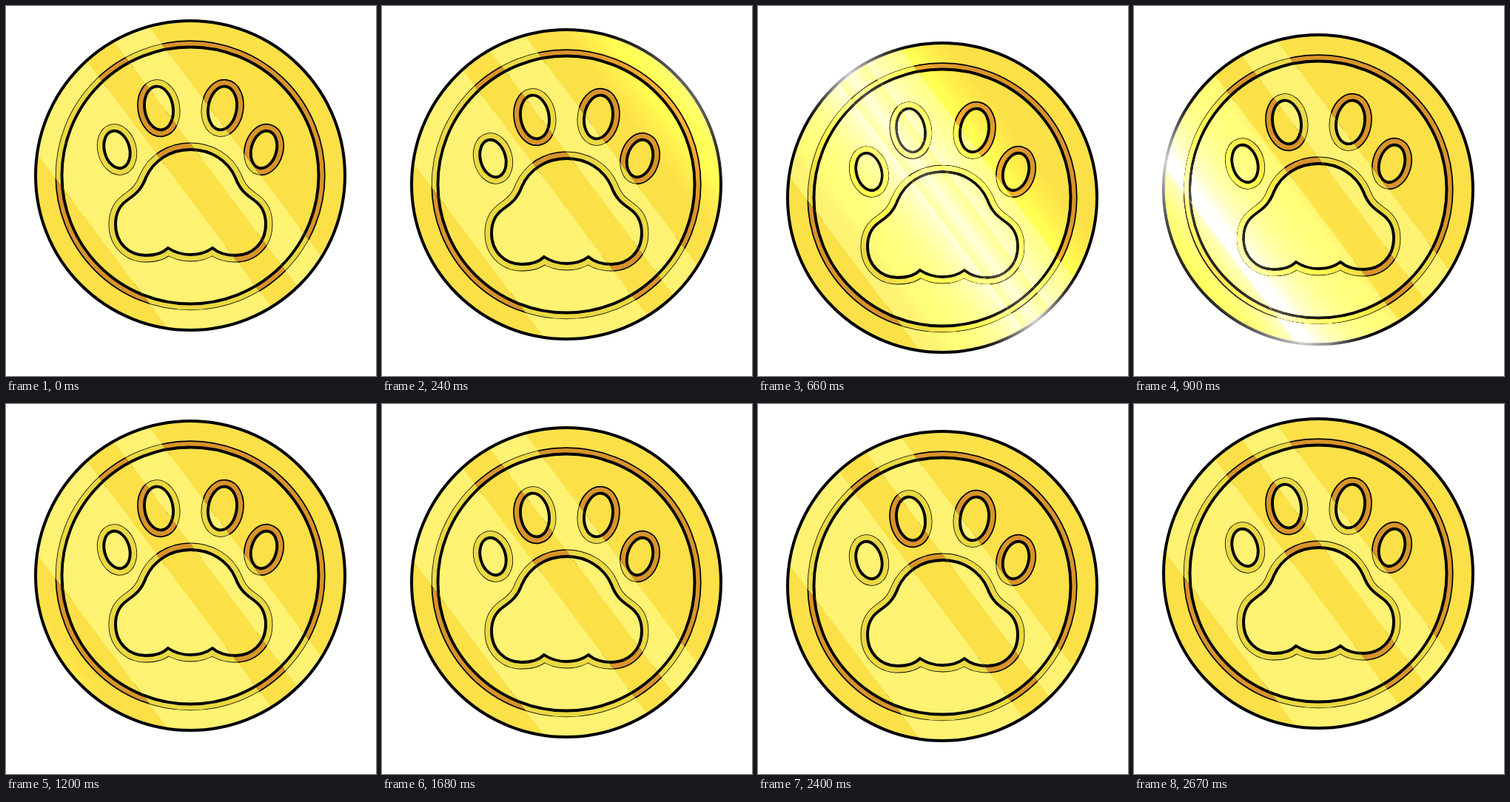
Animation of 500 by 500 pixels, one loop 2.7 s. Source, as an HTML page with a canvas:

```html
<!DOCTYPE html>
<html lang="en">
<head>
<meta charset="utf-8">
<title>Paw coin</title>
<style>
  html, body { margin: 0; width: 100%; height: 100%; overflow: hidden; background: #fff; }
  canvas { display: block; }
</style>
</head>
<body>
<canvas id="stage" width="500" height="500"></canvas>
<script>
const ctx = document.getElementById('stage').getContext('2d');
const LOOP = 2700, STEP = 30;
const CX = 249, CY = 229, RADIUS = 209;

// Unit normal of the diagonal stripes, pointing to the upper right
const NX = 0.8, NY = -0.6;

const LIGHT = { fill: '#fdf272', groove: '#ebd942', line: 0.8 };
const DARK = { fill: '#fbe048', groove: '#d9942a', line: 1.7 };
const DARK_STRIPES = [[-300, -148], [-19, 26], [76, 300]];

function circle(r) {
  const path = new Path2D();
  path.arc(0, 0, r, 0, Math.PI * 2);
  return path;
}

function toe(x, y, rx, ry, degrees) {
  const path = new Path2D();
  path.ellipse(x, y, rx, ry, degrees * Math.PI / 180, 0, Math.PI * 2);
  return path;
}

const coin = circle(RADIUS);
const face = circle(173.5);
const pads = [
  toe(-99, -35, 17, 25.7, -15),
  toe(-42.5, -91, 19.2, 29.6, -9),
  toe(43.5, -91, 19.2, 29.6, 9),
  toe(99.5, -35, 17, 25.7, 15),
  new Path2D(`M0.5-35C-27-35-50-20-60 3C-67 22-77 27-86 34
    C-97 42-101 52-101 66C-101 91-83 108-60 108
    C-48 108-37 105-30 98C-21 104-11 107 0.5 107
    C12 107 22 104 30 98C38 105 49 108 61 108
    C84 108 102 91 102 66C102 52 98 42 87 34
    C78 27 68 22 61 3C51-20 28-35 0.5-35Z`)
];

function stroke(path, width, color) {
  ctx.lineWidth = width;
  ctx.strokeStyle = color;
  ctx.stroke(path);
}

// A shape with a coloured groove around it
function emboss(path, gap, theme) {
  stroke(path, 2 * gap + theme.line, '#000');
  stroke(path, 2 * gap - theme.line, theme.groove);
  ctx.fillStyle = theme.fill;
  ctx.fill(path);
  stroke(path, 3.9, '#000');
}

function drawFaceplate(theme) {
  ctx.fillStyle = theme.fill;
  ctx.fill(coin);
  emboss(face, 8.3, theme);
  for (const pad of pads) emboss(pad, 9, theme);
}

function clipToStripes() {
  const point = (across, along) => [NX * across - NY * along, NY * across + NX * along];
  const area = new Path2D();
  for (const [from, to] of DARK_STRIPES) {
    area.moveTo(...point(from, -300));
    area.lineTo(...point(to, -300));
    area.lineTo(...point(to, 300));
    area.lineTo(...point(from, 300));
    area.closePath();
  }
  ctx.clip(area);
}

// A band across the stripes, given by its colours from the middle outwards
function shineBand(middle, half, colors) {
  const a = middle - half, b = middle + half;
  const gradient = ctx.createLinearGradient(NX * a, NY * a, NX * b, NY * b);
  colors.forEach((color, i) => {
    const offset = i / (colors.length - 1) / 2;
    gradient.addColorStop(0.5 - offset, color);
    gradient.addColorStop(0.5 + offset, color);
  });
  return gradient;
}

function drawShine(time) {
  const middle = 393 - 0.595 * time;
  if (middle < -345) return;
  const gray = level => `rgb(${level},${level},${level})`;
  const veil = alpha => `rgba(255,255,255,${alpha})`;
  ctx.save();
  ctx.globalCompositeOperation = 'color-dodge';
  ctx.fillStyle = shineBand(middle, 130, [165, 95, 50, 20, 0].map(gray));
  ctx.fill(coin);
  ctx.restore();
  ctx.fillStyle = shineBand(middle, 70, [0.3, 0.1, 0].map(veil));
  ctx.fill(coin);
  stroke(coin, 5, shineBand(middle, 110, [0.8, 0.5, 0.2, 0.05, 0].map(veil)));
}

// The coin sinks for 570 ms, rises for 780 ms, then does the same in reverse
function sink(time) {
  const t = Math.min(time, LOOP - time);
  const u = t < 570 ? t / 570 : (1350 - t) / 780;
  return Math.round(31 * u * u * (3 - 2 * u));
}

function draw(time) {
  ctx.fillStyle = '#fff';
  ctx.fillRect(0, 0, 500, 500);
  ctx.save();
  ctx.translate(CX, CY + sink(time));
  drawFaceplate(LIGHT);
  ctx.save();
  clipToStripes();
  drawFaceplate(DARK);
  ctx.restore();
  stroke(coin, 4, '#000');
  drawShine(time);
  ctx.restore();
}

const start = performance.now();
function tick() {
  const time = (performance.now() - start) % LOOP;
  draw(Math.floor(time / STEP) * STEP);
  requestAnimationFrame(tick);
}
tick();
</script>
</body>
</html>
```
